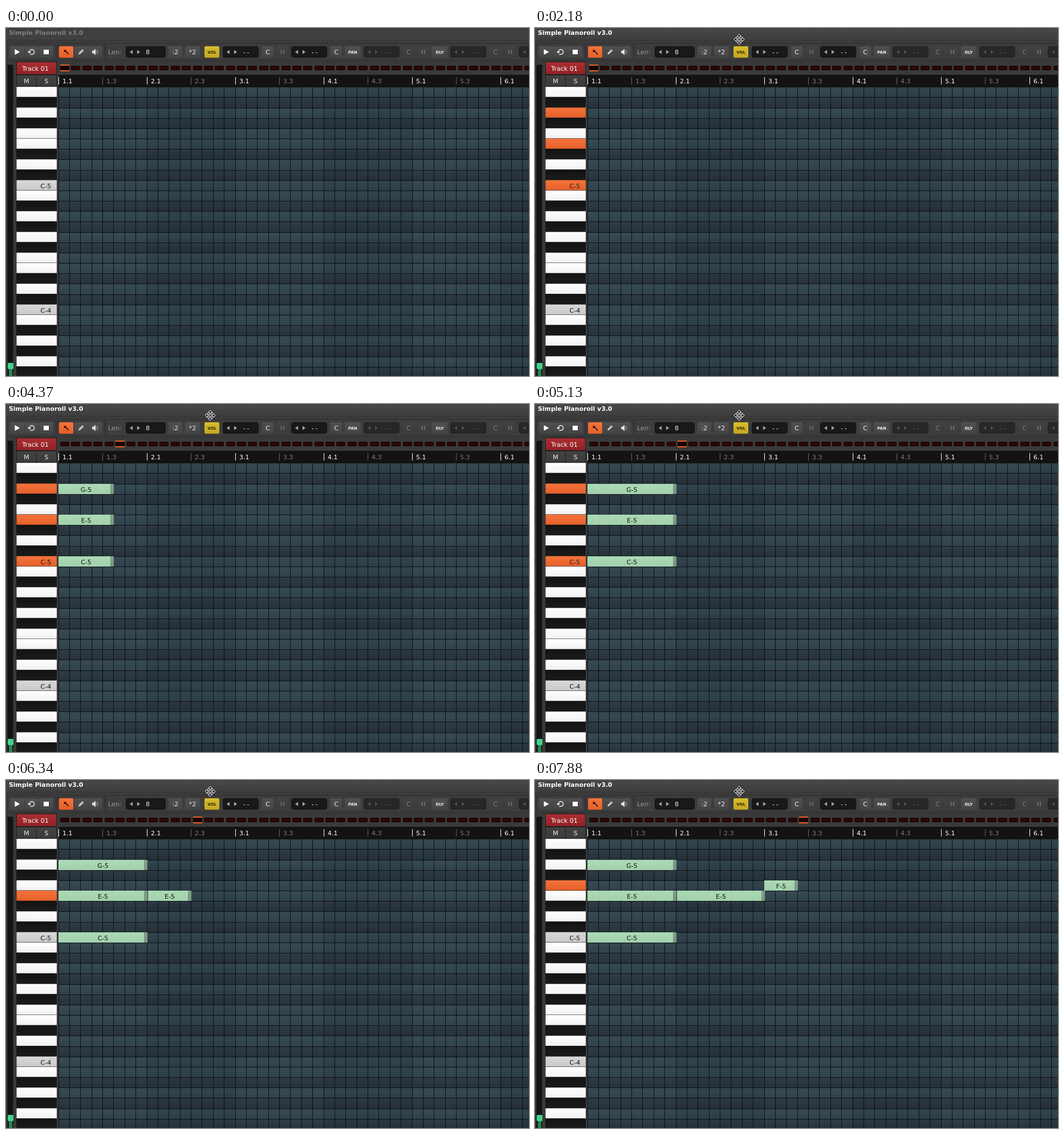
An HTML page that plays this animation: 917x610 px, repeating every 7.99 s.

```html
<!DOCTYPE html>
<html lang="en">
<head>
<meta charset="utf-8">
<title>Piano roll</title>
<style>
  html, body { margin: 0; width: 100%; height: 100%; overflow: hidden; background: #3a3a3a; }
  svg { display: block; width: 917px; height: 610px; }
  text { font: 11px "DejaVu Sans", Verdana, sans-serif; }
  rect { shape-rendering: crispEdges; }
  rect[rx], .soft { shape-rendering: auto; }
  .title { font-weight: bold; font-size: 10.9px; }
  .tiny { font-weight: bold; font-size: 7px; }
  .dashes { letter-spacing: 2.5px; }
</style>
</head>
<body>
<svg id="stage" viewBox="0 0 917 610"></svg>
<script>
const LOOP = 7990;
const GRID_X = 92, CELL = 19.375, GRID_Y = 103.17, ROW = 18.1667, ROWS = 28, STEPS = 43;

// Moments at which the playhead advances by one step
const TICKS = [3600, 3930, 4040, 4150, 4370, 4590, 4700, 5130, 5790, 5900,
  6120, 6340, 6450, 6560, 6780, 6890, 7550, 7660, 7880];
const NOTES = [
  { row: 2, start: 0, end: 8, name: "G-5" },
  { row: 5, start: 0, end: 8, name: "E-5" },
  { row: 9, start: 0, end: 8, name: "C-5" },
  { row: 5, start: 8, end: 16, name: "E-5" },
  { row: 4, start: 16, end: 24, name: "F-5" }
];
const PRESSES = [
  { row: 2, from: 2180, to: 5350 },
  { row: 5, from: 2180, to: 5350 },
  { row: 9, from: 2180, to: 5350 },
  { row: 5, from: 5570, to: 7220 },
  { row: 4, from: 7330, to: LOOP }
];
const MOVE = { from: 320, frame: 110, count: 7, x0: 678, y0: 482, x1: 358, y1: 20 };

const stage = document.getElementById("stage");

function add(tag, attrs, parent = stage) {
  const el = document.createElementNS("http://www.w3.org/2000/svg", tag);
  for (const key in attrs) el.setAttribute(key, attrs[key]);
  return parent.appendChild(el);
}
const rect = (x, y, width, height, fill, more, parent) =>
  add("rect", { x, y, width, height, fill, ...more }, parent);
const path = (d, fill, more, parent) => add("path", { d, fill, ...more }, parent);
function label(x, y, string, fill, more, parent) {
  const el = add("text", { x, y, fill, ...more }, parent);
  el.textContent = string;
  return el;
}
const show = (el, on) => el.setAttribute("visibility", on ? "visible" : "hidden");

const defs = add("defs", {});
function shade(id, top, bottom) {
  const g = add("linearGradient", { id, x2: 0, y2: 1 }, defs);
  add("stop", { offset: 0, "stop-color": top }, g);
  add("stop", { offset: 1, "stop-color": bottom }, g);
  return `url(#${id})`;
}
const fills = {
  bar: shade("bar", "#3d3d3d", "#414141"),
  activeBar: shade("activeBar", "#474747", "#3e3e3e"),
  button: shade("button", "#505050", "#444444"),
  off: shade("off", "#424242", "#3b3b3b"),
  hot: shade("hot", "#f4733a", "#e4602a"),
  yellow: shade("yellow", "#d6bd2c", "#c4a81f"),
  red: shade("red", "#ab2d30", "#8f2225"),
  white: shade("white", "#ffffff", "#f1f1f1"),
  octave: shade("octave", "#d8d8d8", "#c9c9c9"),
  black: shade("black", "#131313", "#1a1a1a"),
  note: shade("note", "#abdab5", "#a2d0ac"),
  cap: shade("cap", "#829f89", "#789580"),
  cells: [
    [shade("w0", "#384a53", "#30424b"), shade("b0", "#303c45", "#26333b")],
    [shade("w1", "#33454e", "#2c3d46"), shade("b1", "#2c3841", "#242f38")]
  ]
};

const stepX = i => GRID_X + CELL * i;
const rowTop = i => GRID_Y + ROW * i;
const rowY = i => Math.round(rowTop(i));
const semitone = row => (45 - row) % 12;
const isBlack = row => [1, 3, 6, 8, 10].includes(semitone(row));

function button(x, width, fill, string, ink, more) {
  rect(x, 32, width, 20, fill, { rx: 2 });
  if (string) label(x + width / 2, 46, string, ink, { "text-anchor": "middle", ...more });
}
function valueBox(x, width, string, live) {
  const ink = live ? "#a8a8a8" : "#505050";
  rect(x + .5, 32.5, width - 1, 19, live ? "#191919" : "#272727", { rx: 3, stroke: live ? "#111" : "#222" });
  path(`M${x + 12} 38.5v7l-5-3.5zM${x + 20} 38.5v7l5-3.5z`, ink);
  label(x + (string === "8" ? 35 : 36), 46, string, live ? "#eee" : "#666",
    string === "8" ? {} : { class: "dashes" });
}

function drawFrame() {
  rect(0, 0, 917, 610, "#3a3a3a");
  const bar = rect(0, 0, 917, 21, fills.bar);
  rect(0, 21, 917, 1, "#2a2a2a");
  rect(0, 22, 917, 1, "#464646");
  for (const [x, width] of [[2, 85], [89, 83], [174, 760]])
    rect(x + .5, 27.5, width, 28, "#3d3d3d", { rx: 3, stroke: "#303030" });
  rect(0, 58, 917, 1, "#333");
  return bar;
}

function drawToolbar() {
  for (const x of [7, 33, 58]) button(x, x === 33 ? 24 : 25, fills.button);
  path("M15.5 37v10l9-5z", "#fff");
  path("M41 42a4.300 4.300 0 1 1 4.300 4.300h-3", "none", { stroke: "#eee", "stroke-width": 1.5 });
  path("M38 41h6l-3 3.800z", "#eee");
  rect(66, 38, 9, 8, "#fff");

  button(93, 25, fills.hot);
  path("M101.500 38.500h5l-1.500 1.500 5.500 5.500-1.300 1.300-5.500-5.500-2.200 1.700z", "#301206");
  button(119, 25, fills.button);
  path("M127 46.500l1-3.200 6-6 2.200 2.200-6 6z", "#d0d0d0");
  button(145, 23, fills.button);
  path("M151 40h2l4-3.500v11l-4-3.500h-2z", "#e4e4e4");
  path("M159 38v8M161 39.500v5", "none", { stroke: "#999" });

  label(179, 46, "Len:", "#9c9c9c");
  valueBox(210, 70, "8", true);
  button(285, 24, fills.button, ":2", "#eee");
  button(314, 26, fills.button, "*2", "#eee");

  const tiny = { class: "tiny", y: 44.5 };
  const small = (x, string, live) =>
    button(x, 20, live ? fills.button : fills.off, string, live ? "#eee" : "#808080");
  button(348, 26, fills.yellow, "VOL", "#2c2604", tiny);
  valueBox(380, 63, "--", true);
  small(449, "C", true);
  small(475, "H", false);
  valueBox(500, 63, "--", true);
  small(569, "C", true);
  button(594, 28, fills.button, "PAN", "#eee", tiny);
  valueBox(627, 63, "--", false);
  small(696, "C", false);
  small(722, "H", false);
  button(747, 27, fills.button, "DLY", "#eee", tiny);
  valueBox(779, 63, "--", false);
  small(848, "C", false);
  small(874, "H", false);
  valueBox(899, 63, "--", false);
}

function drawSide() {
  rect(2.5, 64.5, 10, 560, "#141414", { rx: 2, stroke: "#222" });
  rect(5, 597, 6, 13, "#2a8156");
  rect(3, 587, 10, 11, "#3ed488", { rx: 2 });
  rect(18, 59, 71, 23, "#202020");
  rect(19, 60, 69, 21, fills.red);
  label(51.5, 75, "Track 01", "#fff", { "text-anchor": "middle" });
  rect(18, 82, 71, 21, "#202020");
  for (const [x, string] of [[19, "M"], [54, "S"]]) {
    rect(x, 83, 34, 19, fills.off);
    label(x + 17, 97, string, "#f0f0f0", { "text-anchor": "middle" });
  }
}

function drawRuler() {
  rect(92, 82, 825, 21, "#131313");
  for (let half = 0; half < 11; half++) {
    const x = Math.floor(stepX(half * 4)), strong = half % 2 === 0;
    rect(x, 86, 1, 13, strong ? "#fff" : "#666");
    label(x + 7, 97, `${(half >> 1) + 1}.${strong ? 1 : 3}`, strong ? "#fff" : "#7c7c7c");
  }
  for (let i = 0; i < STEPS; i++)
    rect(Math.round(stepX(i)) + 3.5, 66.5, 15, 7, "#2b0706", { rx: 1, stroke: "#110505" });
}

function drawGrid() {
  rect(92, 103, 825, 507, "#0b1114");
  for (let row = 0; row < ROWS; row++) {
    const y = rowY(row) + 1, height = rowY(row + 1) - y;
    for (let i = 0; i < STEPS; i++) {
      const x = Math.floor(stepX(i)) + 1, width = Math.floor(stepX(i + 1)) - x;
      rect(x, y, width, height, fills.cells[(i >> 3) % 2][+isBlack(row)]);
    }
  }
}

function drawKeys() {
  rect(18, 103, 71, 507, "#1c1c1c");
  return Array.from({ length: ROWS }, (_, row) => {
    const octave = semitone(row) === 0;
    const rest = isBlack(row) ? fills.black : octave ? fills.octave : fills.white;
    const el = rect(18.5, rowTop(row), 70.5, ROW - .6, rest, { class: "soft" });
    if (octave) label(60.5, rowY(row) + 14, row === 9 ? "C-5" : "C-4", "#151515");
    return { el, rest };
  });
}

function makeNote(note) {
  const g = add("g", {}), y = rowY(note.row), height = rowY(note.row + 1) - y;
  const abuts = NOTES.some(other => other.row === note.row && other.end === note.start);
  return {
    ...note, g,
    x: stepX(note.start) + (abuts ? 2 : 0),
    body: rect(0, y, 0, height, fills.note, {}, g),
    cap: rect(0, y, 6, height, fills.cap, {}, g),
    text: label(0, y + 14, note.name, "#111", { "text-anchor": "middle" }, g)
  };
}

const bar = drawFrame();
const title = label(5, 12, "Simple Pianoroll v3.0", "#808080", { class: "title" });
drawToolbar();
drawSide();
drawRuler();
drawGrid();
const keys = drawKeys();
const notes = NOTES.map(makeNote);

const head = add("g", {});
rect(0, 64, 16, 12, "#170504", {}, head);
for (const y of [64, 74]) rect(0, y, 16, 2, "#e8622c", {}, head);

const outline = { stroke: "#fff", "stroke-linejoin": "round" };
const arrow = path("M0 0v17l4-3.500 2.800 6 2.700-1.200-2.700-5.800h5.700z", "#111", outline);
const mover = path("M0-9l4 4h-3v4h4v-3l4 4-4 4v-3h-4v4h3l-4 4-4-4h3v-4h-4v3l-4-4 4-4v3h4v-4h-3z",
  "#16162a", { ...outline, transform: `translate(${MOVE.x1} ${MOVE.y1})` });

function drawCursor(t) {
  const k = Math.floor((t - MOVE.from) / MOVE.frame);
  const clicked = k >= MOVE.count;
  show(mover, clicked);
  show(arrow, k >= 0 && !clicked);
  title.setAttribute("fill", clicked ? "#fff" : "#808080");
  bar.setAttribute("fill", clicked ? fills.activeBar : fills.bar);
  const p = Math.min(Math.max(k / (MOVE.count - 1), 0), 1), ease = p * p * (3 - 2 * p);
  const x = MOVE.x0 + (MOVE.x1 - MOVE.x0) * ease, y = MOVE.y0 + (MOVE.y1 - MOVE.y0) * ease;
  arrow.setAttribute("transform", `translate(${x} ${y})`);
}

function drawNote(note, step) {
  const length = Math.min(step, note.end) - note.start;
  show(note.g, length > 0);
  if (length <= 0) return;
  const end = Math.floor(stepX(note.start + length)) + 1;
  note.body.setAttribute("x", note.x);
  note.body.setAttribute("width", end - note.x);
  note.cap.setAttribute("x", end - 6);
  note.text.setAttribute("x", (note.x + end) / 2);
  note.text.setAttribute("display", length > 1 ? "inline" : "none");
}

function render(t) {
  const step = TICKS.filter(tick => tick <= t).length;
  head.setAttribute("transform", `translate(${Math.round(stepX(step)) + 3} 0)`);
  notes.forEach(note => drawNote(note, step));
  keys.forEach(({ el, rest }, row) => {
    const down = PRESSES.some(p => p.row === row && t >= p.from && t < p.to);
    el.setAttribute("fill", down ? fills.hot : rest);
  });
  drawCursor(t);
}

const begin = performance.now();
function tick() {
  render((performance.now() - begin) % LOOP);
  requestAnimationFrame(tick);
}
tick();
</script>
</body>
</html>
```
